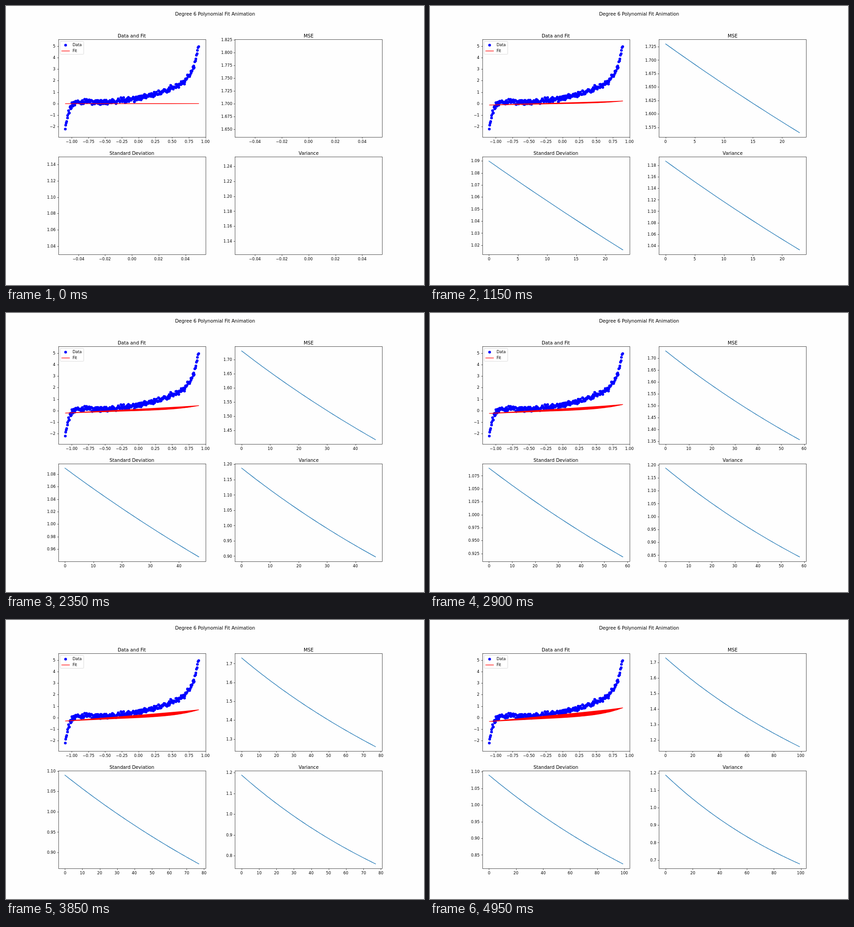
An HTML page with a canvas for the animation above (5 s loop, 917x611 px).

```html
<!DOCTYPE html>
<html lang="en">
<head>
<meta charset="utf-8">
<title>Degree 6 Polynomial Fit Animation</title>
<style>
  html, body { margin: 0; width: 100%; height: 100%; overflow: hidden; background: #fefefe; }
  canvas { display: block; }
</style>
</head>
<body>
<canvas id="stage" width="917" height="611"></canvas>
<script>
const ctx = document.getElementById('stage').getContext('2d');
const W = 917, H = 611, PT = W / 1080;          // a 15 in wide figure
const FRAMES = 100, STEP_MS = 50;
const AX_W = W * 0.775 / 2.2, AX_H = H * 0.35;
const COLS = [W * 0.125, W * 0.9 - AX_W], ROWS = [H * 0.12, H * 0.89 - AX_H];
const TICK = 3.5 * PT, LINE = 1.5 * PT;

// ---------- data ----------
let seed = 20;
function rand() {
  seed = (seed + 0x6D2B79F5) | 0;
  let t = Math.imul(seed ^ (seed >>> 15), seed | 1);
  t ^= t + Math.imul(t ^ (t >>> 7), t | 61);
  return ((t ^ (t >>> 14)) >>> 0) / 4294967296;
}

// a parabola with a steep tail at each end
const trend = x => 0.13 + (x + 0.6) ** 2
  + 2.67 * Math.exp(11.6 * (x - 0.9))
  - 2.8 * Math.exp(-17.5 * (x + 1.1));

const COUNT = 290;
const points = Array.from({ length: COUNT }, (_, i) => {
  const u = 2 * (i + rand()) / COUNT - 1;
  const x = -0.1 + 0.93 * u + 0.07 * u ** 3;    // slightly sparser at the ends
  return [x, trend(x) + (rand() + rand() + rand() - 1.5) * 0.23];
});
// unsorted order makes the fit line criss-cross
for (let i = COUNT - 1; i > 0; i--) {
  const j = Math.floor(rand() * (i + 1));
  [points[i], points[j]] = [points[j], points[i]];
}

// ---------- gradient descent, no bias term ----------
const poly = (w, x) => w.reduceRight((sum, c) => (sum + c) * x, 0);
const RATE = 0.0106;
const weights = [];
let w = Array(6).fill(0);
for (let n = 0; n < FRAMES; n++) {
  const grad = w.map(() => 0);
  for (const [x, y] of points) {
    let p = y - poly(w, x);
    for (let k = 0; k < 6; k++) grad[k] += (p *= x);
  }
  w = w.map((c, k) => c + RATE * grad[k] / COUNT);
  weights.push(w);
}

const std = t => 0.3848 + 0.705 * Math.exp(-0.0048 * t);
const variance = t => std(t) ** 2;
const mse = t => variance(t) + 0.5424 - 0.000367 * t - 2.56e-6 * t * t;

// ---------- plotting ----------
const snap = v => Math.round(v) + 0.5;

// align: 0 left, 0.5 centre, 1 right
function text(str, x, y, size, align = 0.5) {
  ctx.font = `${size * PT}px "DejaVu Sans", sans-serif`;
  ctx.fillStyle = '#000';
  ctx.fillText(str, Math.round(x - align * ctx.measureText(str).width), Math.round(y));
}

function stroke(pts, color) {
  ctx.beginPath();
  for (const [x, y] of pts) ctx.lineTo(x, y);
  ctx.strokeStyle = color;
  ctx.lineWidth = LINE;
  ctx.lineJoin = 'round';
  ctx.lineCap = 'square';
  ctx.stroke();
}

function dot(x, y) {
  ctx.beginPath();
  ctx.arc(x, y, 3.5 * PT, 0, 7);
  ctx.fillStyle = '#00f';
  ctx.fill();
}

function thinPen() {
  ctx.strokeStyle = '#000';
  ctx.lineWidth = 0.8 * PT;
  ctx.lineJoin = 'miter';
  ctx.lineCap = 'butt';
}

function limits(a, b) {
  const pad = a === b ? 0.055 * (Math.abs(a) || 1) : 0.05 * (b - a);
  return [a - pad, b + pad];
}

// smallest round step that leaves at most nine intervals
function ticks([lo, hi]) {
  const raw = (hi - lo) / 9, base = 10 ** Math.floor(Math.log10(raw));
  const step = base * [1, 2, 2.5, 5, 10].find(s => s * base >= raw * (1 - 1e-9));
  let digits = 0;
  while (Math.abs(step * 10 ** digits - Math.round(step * 10 ** digits)) > 1e-6) digits++;
  const list = [];
  for (let k = Math.ceil(lo / step - 1e-9); k * step <= hi + step * 1e-9; k++) {
    list.push([k * step, (k < 0 ? '\u2212' : '') + Math.abs(k * step).toFixed(digits)]);
  }
  return list;
}

function axes(col, row, title, xlim, ylim, draw) {
  const left = COLS[col], top = ROWS[row], right = left + AX_W, bottom = top + AX_H;
  const px = x => left + AX_W * (x - xlim[0]) / (xlim[1] - xlim[0]);
  const py = y => bottom - AX_H * (y - ylim[0]) / (ylim[1] - ylim[0]);

  thinPen();
  ctx.beginPath();
  for (const [v, label] of ticks(xlim)) {
    const x = snap(px(v));
    ctx.moveTo(x, snap(bottom));
    ctx.lineTo(x, snap(bottom) + TICK);
    text(label, px(v), bottom + 13, 10);
  }
  for (const [v, label] of ticks(ylim)) {
    const y = snap(py(v));
    ctx.moveTo(snap(left), y);
    ctx.lineTo(snap(left) - TICK, y);
    text(label, left - 2 * TICK, py(v) + 3.1, 10, 1);
  }
  ctx.stroke();

  draw(px, py);

  thinPen();
  ctx.strokeRect(snap(left), snap(top), snap(right) - snap(left), snap(bottom) - snap(top));
  text(title, (left + right) / 2, top - 6 * PT + 1, 12);
}

function legend() {
  const x = COLS[0] + 5 * PT, y = ROWS[0] + 5 * PT, lineY = snap(y + 20);
  ctx.beginPath();
  ctx.roundRect(x, y, 51.6, 28.2, 1.7);
  ctx.fillStyle = 'rgba(255,255,255,.8)';
  ctx.fill();
  ctx.strokeStyle = 'rgba(204,204,204,.8)';
  ctx.lineWidth = PT;
  ctx.stroke();
  dot(x + 14 * PT, y + 8.1);
  stroke([[x + 4 * PT, lineY], [x + 24 * PT, lineY]], '#f00');
  text('Data', x + 32 * PT, y + 10.6, 10, 0);
  text('Fit', x + 32 * PT, y + 23, 10, 0);
}

function metric(col, row, title, fn, n) {
  axes(col, row, title, limits(0, n), limits(fn(n), fn(0)), (px, py) => {
    if (!n) return;
    stroke(Array.from({ length: n + 1 }, (_, t) => [px(t), py(fn(t))]), '#1f77b4');
  });
}

function render(n) {
  ctx.fillStyle = '#fefefe';
  ctx.fillRect(0, 0, W, H);
  text('Degree 6 Polynomial Fit Animation', W / 2, 21, 12);
  axes(0, 0, 'Data and Fit', limits(-1.1, 0.9), limits(-2.52, 5.18), (px, py) => {
    for (const [x, y] of points) dot(px(x), py(y));
    stroke(points.map(([x]) => [px(x), py(poly(weights[n], x))]), '#f00');
    legend();
  });
  metric(1, 0, 'MSE', mse, n);
  metric(0, 1, 'Standard Deviation', std, n);
  metric(1, 1, 'Variance', variance, n);
}

const start = performance.now();
let shown = -1;
function tick() {
  const n = Math.floor((performance.now() - start) / STEP_MS) % FRAMES;
  if (n !== shown) render(shown = n);
  requestAnimationFrame(tick);
}
tick();
</script>
</body>
</html>
```
